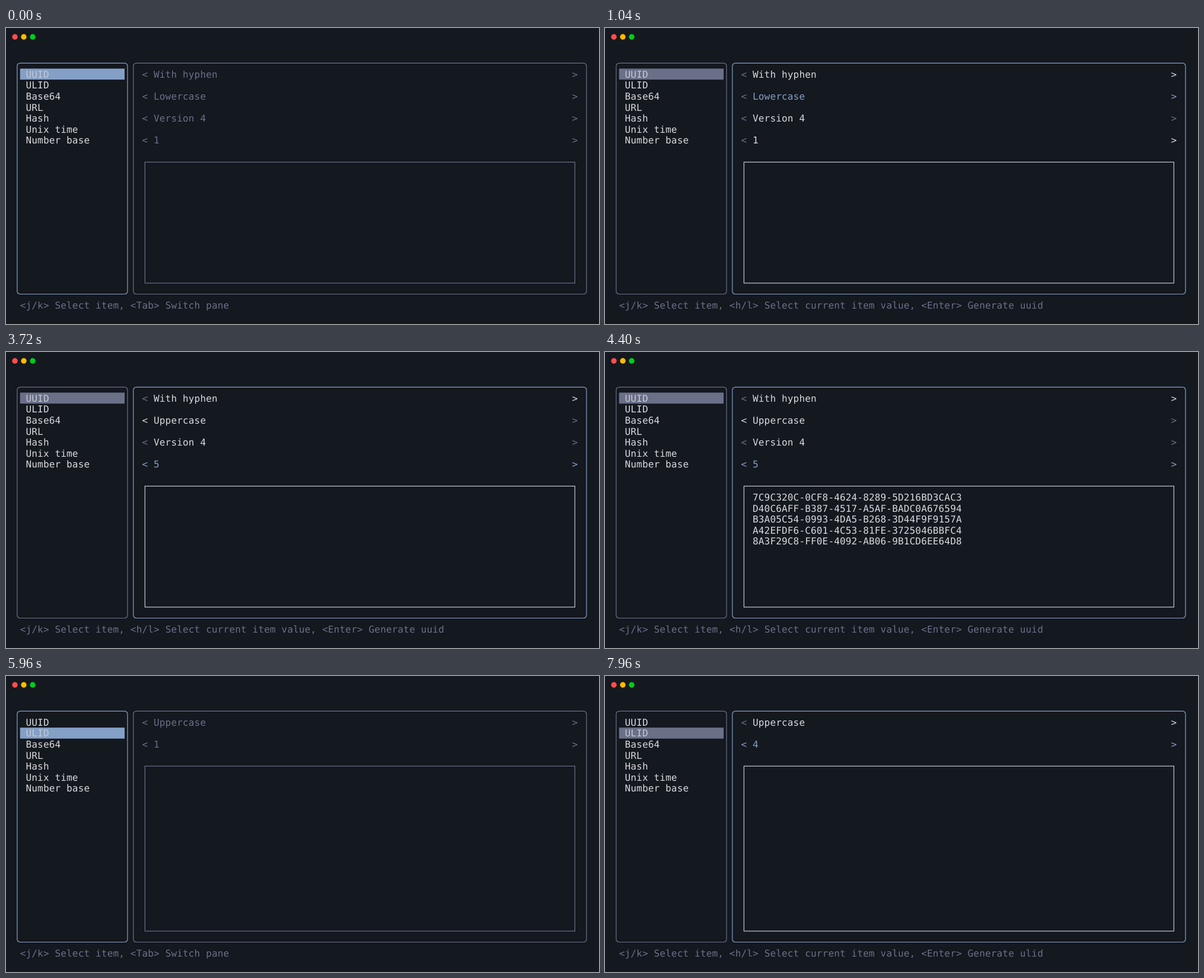
These frames come from a looping animation (1000x500 px, 8 s). An HTML page:

```html
<!DOCTYPE html>
<html lang="en">
<head>
<meta charset="utf-8">
<title>Terminal tool picker</title>
<style>
  html, body { margin: 0; width: 100%; height: 100%; overflow: hidden; background: #14181f; }
  svg { display: block; width: 1000px; height: 500px; }
  text {
    font: 16px "DejaVu Sans Mono", monospace;
    letter-spacing: 0.165px;
    white-space: pre;
    text-rendering: geometricPrecision;
  }
</style>
</head>
<body>
<svg id="screen" viewBox="0 0 1000 500">
  <circle cx="15" cy="15" r="4.7" fill="#ff4f4d"/>
  <circle cx="30" cy="15" r="4.7" fill="#febb00"/>
  <circle cx="45" cy="15" r="4.7" fill="#00cc1d"/>
  <g id="view"></g>
</svg>
<script>
const LOOP = 8000;
const CELL_W = 9.797, CELL_H = 18.58, LEFT = 23.7, TOP = 68.6;
const DIM = '#6b7089', BLUE = '#84a0c6', TEXT = '#d8dade', SOFT = '#c6c8d1';

const TOOLS = ['UUID', 'ULID', 'Base64', 'URL', 'Hash', 'Unix time', 'Number base'];
const IDS = [
  '7C9C320C-0CF8-4624-8289-5D216BD3CAC3',
  'D40C6AFF-B387-4517-A5AF-BADC0A676594',
  'B3A05C54-0993-4DA5-B268-3D44F9F9157A',
  'A42EFDF6-C601-4C53-81FE-3725046BBFC4',
  '8A3F29C8-FF0E-4092-AB06-9B1CD6EE64D8'
];

// Each step changes only the listed fields; row -1 means the list has focus.
const STEPS = [
  [0, { tool: 0, row: -1, upper: false, count: 1, ids: false }],
  [480, { row: 0 }],
  [1040, { row: 1 }],
  [1560, { upper: true }],
  [2080, { row: 2 }],
  [2600, { row: 3 }],
  [3160, { count: 2 }],
  [3360, { count: 3 }],
  [3520, { count: 4 }],
  [3720, { count: 5 }],
  [4400, { ids: true }],
  [5440, { row: -1 }],
  [5960, { tool: 1, count: 1, ids: false }],
  [6520, { row: 0 }],
  [7040, { row: 1 }],
  [7560, { count: 2 }],
  [7760, { count: 3 }],
  [7960, { count: 4 }]
];

const view = document.getElementById('view');
const colX = c => LEFT + c * CELL_W;
const rowY = r => TOP + r * CELL_H;

function add(tag, attrs, content = '') {
  const el = document.createElementNS('http://www.w3.org/2000/svg', tag);
  for (const key in attrs) el.setAttribute(key, attrs[key]);
  el.textContent = content;
  view.append(el);
}

function print(col, row, content, fill) {
  add('text', { x: colX(col), y: rowY(row) + 15.2, fill }, content);
}

// Borders run through the centres of their cells.
function frame(c0, r0, c1, r1, stroke, rx) {
  add('rect', {
    x: colX(c0 + 0.5), y: rowY(r0 + 0.5),
    width: (c1 - c0) * CELL_W, height: (r1 - r0) * CELL_H,
    rx, stroke, fill: 'none', 'stroke-width': 1.2
  });
}

// An option is [value, can go left, can go right].
function options(s) {
  const count = [String(s.count), s.count > 1, true];
  if (s.tool === 1) return [['Uppercase', false, true], count];
  return [
    ['With hyphen', false, true],
    [s.upper ? 'Uppercase' : 'Lowercase', s.upper, !s.upper],
    ['Version 4', false, false],
    count
  ];
}

function draw(s) {
  view.replaceChildren();
  const inList = s.row < 0;

  frame(-1, -1, 18, 20, inList ? BLUE : DIM, 5);
  add('rect', {
    x: colX(0), y: rowY(s.tool), width: 18 * CELL_W, height: CELL_H,
    fill: inList ? BLUE : DIM
  });
  TOOLS.forEach((name, i) => print(1, i, name, i === s.tool ? SOFT : TEXT));

  frame(19, -1, 97, 20, inList ? DIM : BLUE, 5);
  const opts = options(s);
  opts.forEach(([value, prev, next], i) => {
    const color = inList ? DIM : i === s.row ? BLUE : TEXT;
    print(21, i * 2, '<', prev ? color : DIM);
    print(23, i * 2, value, color);
    print(95, i * 2, '>', next ? color : DIM);
  });

  const boxRow = opts.length * 2;
  frame(21, boxRow, 95, 19, inList ? DIM : SOFT, 0);
  if (s.ids) IDS.forEach((id, i) => print(23, boxRow + 1 + i, id, inList ? DIM : TEXT));

  const hint = inList
    ? '<Tab> Switch pane'
    : '<h/l> Select current item value, <Enter> Generate ' + TOOLS[s.tool].toLowerCase();
  print(0, 21, '<j/k> Select item, ' + hint, DIM);
}

let shown = -1;
function tick() {
  const t = performance.now() % LOOP;
  const active = STEPS.filter(([at]) => at <= t);
  if (active.length !== shown) {
    shown = active.length;
    draw(Object.assign({}, ...active.map(step => step[1])));
  }
  requestAnimationFrame(tick);
}
tick();
</script>
</body>
</html>
```
